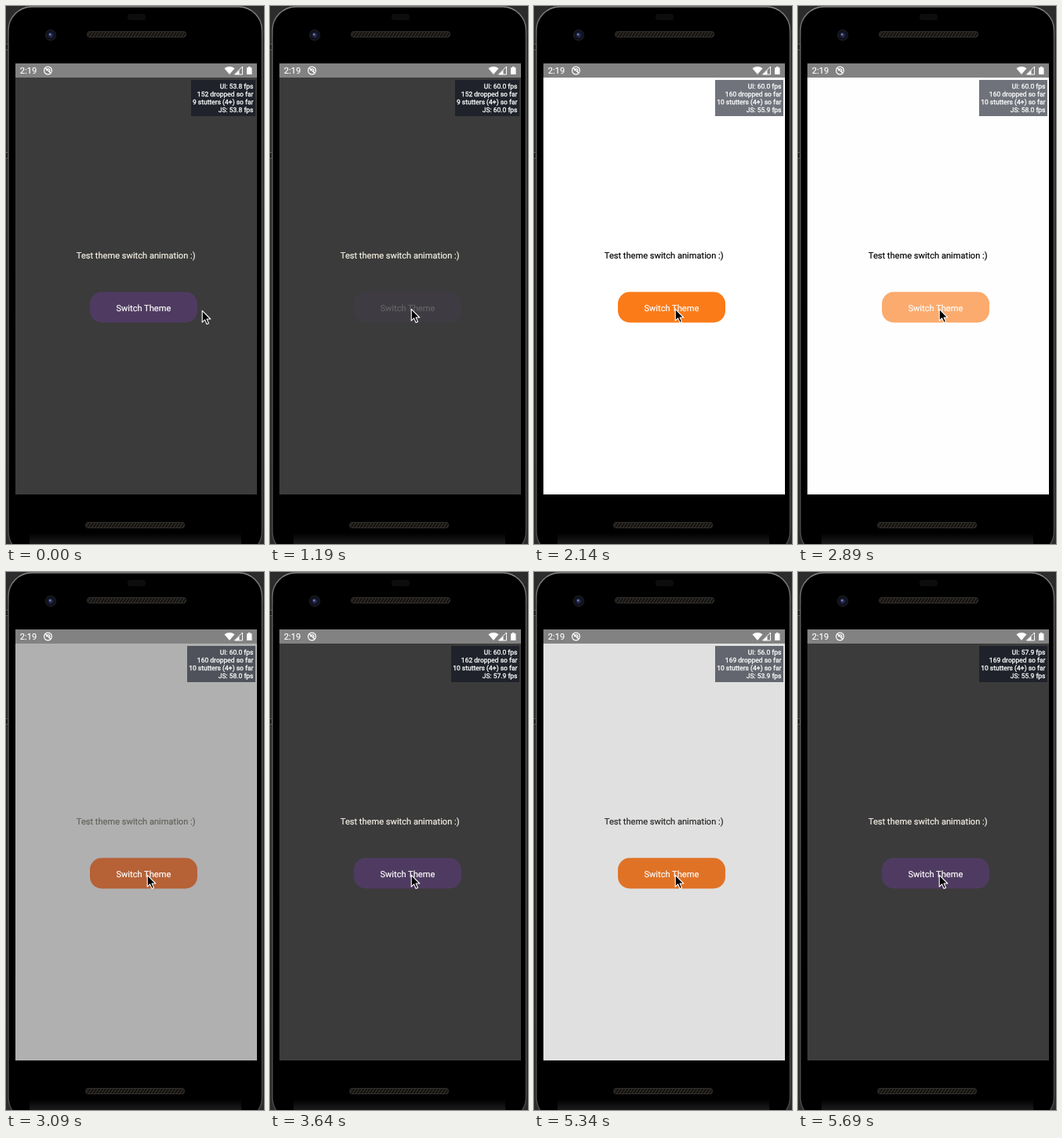
An HTML page for the animation above (6.04 s loop, 329 by 684 pixels).

```html
<!DOCTYPE html>
<html lang="en">
<head>
<meta charset="utf-8">
<title>Theme switch</title>
<style>
  html, body { margin: 0; width: 100%; height: 100%; overflow: hidden; background: #000; }
  svg { display: block; width: 100%; height: 100%; }
  text { font-family: Roboto, "Noto Sans", sans-serif; font-size: 11.1px; fill: #fff; stroke: #fff; stroke-width: .18px; text-rendering: geometricPrecision; }
  #stats text { font-size: 8.5px; text-anchor: end; stroke-width: .3px; }
</style>
</head>
<body>
<svg viewBox="0 0 329 684">
  <defs>
    <pattern id="mesh" width="8" height="6" patternUnits="userSpaceOnUse">
      <rect width="8" height="6" fill="#12110f"/>
      <path d="M1 6L5 0M5 6L9 0M-3 6L1 0" stroke="#37312a" stroke-width="1.2"/>
    </pattern>
    <radialGradient id="lens">
      <stop offset="0" stop-color="#3d4a86"/>
      <stop offset=".4" stop-color="#1a1d35"/>
      <stop offset=".75" stop-color="#0c0d14"/>
      <stop offset="1" stop-color="#25262c"/>
    </radialGradient>
    <linearGradient id="rim" x2="0" y2="1">
      <stop offset="0" stop-color="#8a8a8a"/>
      <stop offset=".06" stop-color="#5c5c5c"/>
      <stop offset="1" stop-color="#484848"/>
    </linearGradient>
    <linearGradient id="chin" x2="0" y2="1">
      <stop offset="0" stop-color="#000"/>
      <stop offset="1" stop-color="#1c1c1c"/>
    </linearGradient>
    <g id="speaker">
      <rect x=".5" y=".5" width="126" height="7" rx="3" fill="url(#mesh)" stroke="#302f30"/>
    </g>
  </defs>

  <!-- phone body -->
  <rect width="329" height="684" fill="#2c2c2c"/>
  <rect x="3" y="1" width="323.5" height="697" rx="30" fill="#000" stroke="url(#rim)" stroke-width="1.5"/>
  <rect x="30" y="670" width="270" height="14" fill="url(#chin)"/>
  <path d="M0 48.5H2.5V55.5H0M0 186.5H2.5V193.5H0" fill="#1a1a1a" stroke="#5a5a5a"/>
  <rect x="155" y="10" width="23" height="8" rx="3" fill="#0d0d0e"/>
  <circle cx="57" cy="37" r="7" fill="url(#lens)"/>
  <circle cx="56" cy="36" r="1.2" fill="#7486c0"/>
  <use href="#speaker" x="103" y="32"/>
  <use href="#speaker" x="101" y="656"/>

  <!-- app -->
  <rect id="screen" x="12" y="73" width="308" height="548"/>
  <rect x="12" y="73" width="308" height="18" fill="#828282"/>
  <text x="17.8" y="86.2">2:19</text>
  <g fill="none" stroke="#fff" stroke-width="1.2">
    <circle cx="53.5" cy="82" r="4.9"/>
    <path d="M50.5 79L56.8 85.2M51.6 82.4A2.2 2.2 0 1 1 55.3 83.6"/>
  </g>
  <g fill="#fff">
    <path d="M278.5 79.2Q285 74.6 291.5 79.2L285 87Z"/>
    <path d="M301.5 77V87H291.5Z" fill="none" stroke="#fff"/>
    <path d="M297.5 81.8V87H292Z"/>
    <path d="M307 78.2H309V77H311.5V78.2H313.5V87H307Z"/>
  </g>
  <text id="label" x="89.8" y="321.2">Test theme switch animation :)</text>
  <g id="button">
    <rect id="pill" x="107" y="363.5" width="137" height="39" rx="15"/>
    <text x="140.4" y="387.6">Switch Theme</text>
  </g>
  <g id="stats">
    <rect id="panel" y="94" height="46" fill="#0c1220" fill-opacity=".587"/>
    <text x="315.5" y="105"/>
    <text x="315.5" y="115"/>
    <text x="315.5" y="125"/>
    <text x="315.5" y="135"/>
  </g>
  <path id="cursor" d="M0 0V14.8L3.4 11.6L5.9 17.2L8.3 16.1L5.9 10.7H10.6Z" fill="#000" stroke="#fff" stroke-width="1.1" stroke-linejoin="round"/>
</svg>
<script>
  const LOOP = 6040, FADE = 500, TICK = 50;
  const $ = id => document.getElementById(id);
  const lines = document.querySelectorAll('#stats text');

  // each colour as [dark theme, light theme]
  const theme = {
    screen: [[59, 59, 59], [255, 255, 255]],
    label: [[246, 243, 230], [0, 0, 0]],
    pill: [[79, 59, 97], [251, 123, 25]]
  };
  const taps = [
    { press: 1190, release: 1380, fade: 1450 },
    { press: 2440, release: 2780, fade: 2856 },
    { press: 3890, release: 4030, fade: 4125 },
    { press: 4940, release: 5130, fade: 5190 }
  ];
  // time, UI fps, dropped, stutters, JS fps
  const readings = [
    [0, '53.8', 152, 9, '53.8'],
    [240, '60.0', 152, 9, '60.0'],
    [1580, '54.0', 160, 10, '52.0'],
    [2030, '60.0', 160, 10, '55.9'],
    [2480, '60.0', 160, 10, '58.0'],
    [3130, '58.1', 162, 10, '56.0'],
    [3630, '60.0', 162, 10, '57.9'],
    [4130, '54.0', 165, 10, '52.0'],
    [4680, '60.0', 165, 10, '60.0'],
    [5230, '56.0', 169, 10, '53.9'],
    [5680, '57.9', 169, 10, '55.9']
  ];

  const ease = x => x < .5 ? 2 * x * x : 1 - 2 * (1 - x) ** 2;
  const progress = (t, start, length) => ease(Math.min(1, Math.max(0, (t - start) / length)));
  const mix = (a, b, k) => a + (b - a) * k;

  function paintTheme(t) {
    const light = taps.reduce((sum, tap, i) =>
      sum + (i % 2 ? -1 : 1) * progress(t, tap.fade, FADE), 0);
    for (const id in theme) {
      const [dark, bright] = theme[id];
      $(id).style.fill = `rgb(${dark.map((c, i) => Math.round(mix(c, bright[i], light)))})`;
    }
    $('label').style.stroke = $('label').style.fill;
  }

  function paintButton(t) {
    const tap = taps.findLast(tap => t >= tap.press - 10);
    $('button').style.opacity = tap ? mix(.2, 1, progress(t, tap.release - 30, 250)) : 1;
  }

  function paintStats(t) {
    const [, ui, dropped, stutters, js] = readings.findLast(r => t >= r[0]);
    const rows = [`UI: ${ui} fps`, `${dropped} dropped so far`, `${stutters} stutters (4+) so far`, `JS: ${js} fps`];
    rows.forEach((row, i) => lines[i].textContent = row);
    const left = stutters > 9 ? 231 : 236;
    $('panel').setAttribute('x', left);
    $('panel').setAttribute('width', 318 - left);
  }

  function paintCursor(t) {
    const travel = progress(t, 0, 430), settle = progress(t, 640, 190);
    const x = 250.2 - 66 * travel - 4 * settle;
    const y = 387.3 - 3 * travel + settle;
    $('cursor').setAttribute('transform', `translate(${x} ${y})`);
  }

  function render(now) {
    const t = Math.max(0, Math.floor((now % LOOP + 20) / TICK) * TICK - 20);
    paintTheme(t);
    paintButton(t);
    paintStats(t);
    paintCursor(t);
    requestAnimationFrame(render);
  }
  render(0);
</script>
</body>
</html>
```
